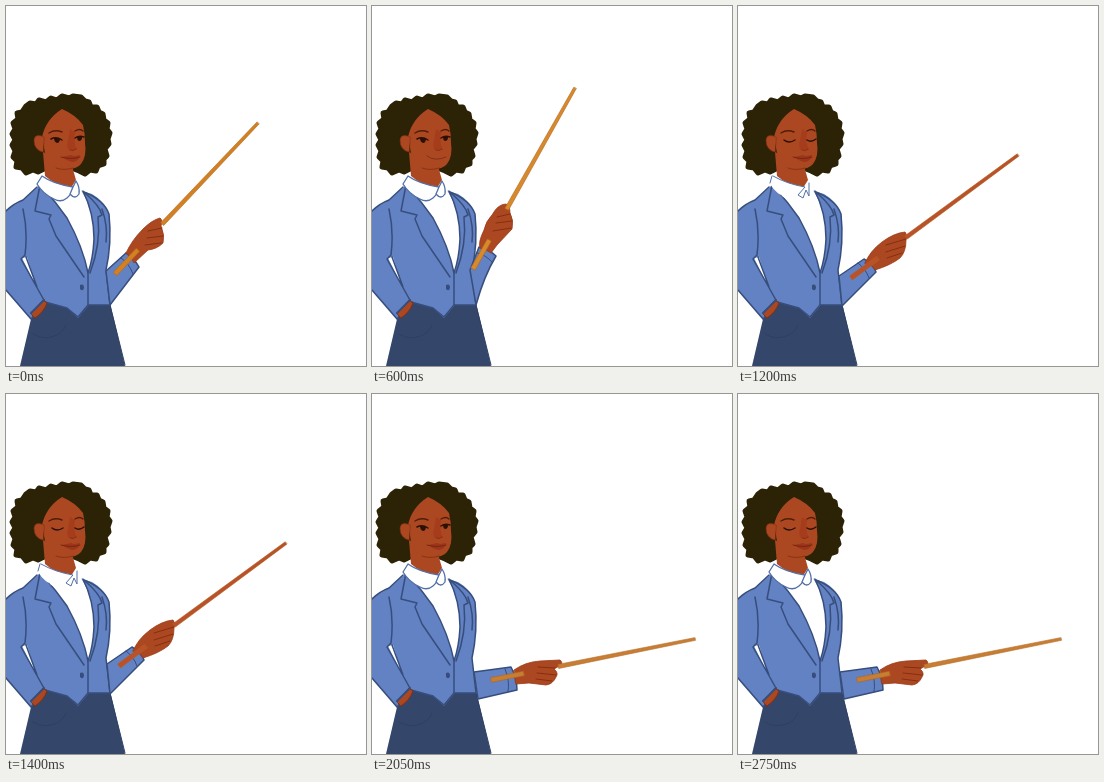
Write an HTML page with a canvas that moves like this. It is 360 px wide and 360 px high and loops after 2.8 s.

```html
<!DOCTYPE html>
<html lang="en">
<head>
<meta charset="utf-8">
<title>Teacher with pointer</title>
<style>
html, body { margin: 0; width: 100%; height: 100%; overflow: hidden; background: #fff; }
canvas { display: block; width: 360px; height: 360px; }
</style>
</head>
<body>
<canvas id="stage" width="360" height="360"></canvas>
<script>
const ctx = document.getElementById('stage').getContext('2d');
const LOOP = 2800, HOLD = 400;
const BLUE = '#6282c4', NAVY = '#374e7d', SKIRT = '#34466a', SKIN = '#ac4821',
      SHADE = '#842f10', HAIR = '#2c2306', WHITE = '#fff';

function fill(d, color) {
  ctx.fillStyle = color;
  ctx.fill(new Path2D(d));
}
function line(d, color = NAVY, width = 1.5) {
  ctx.strokeStyle = color;
  ctx.lineWidth = width;
  ctx.stroke(new Path2D(d));
}
function shape(d, color, edge = NAVY, width = 1.5) {
  fill(d, color);
  line(d, edge, width);
}

const poses = {
  high: {
    sleeve: 'M100 265L120 247Q128 252 133 261L104 299Z',
    cuff: 'M115 252Q123 257 127 268',
    hand: 'M120 247Q126 234 137 223Q146 214 154 212Q157 214 155 220Q159 229 157 237Q151 243 142 244L128 257Q125 250 120 247Z',
    fingers: 'M142 225L156 222M141 232L157 230M139 239L155 237',
    stick: [252, 117, 109, 268], color: '#d28122', collar: 'round', mouth: 'full'
  },
  upright: {
    sleeve: 'M98 264L107 241Q117 243 124 250Q112 270 104 299Z',
    cuff: 'M105 247Q114 249 120 256',
    hand: 'M108 242Q106 236 112 224Q114 215 120 209Q126 198 134 198Q138 200 138 207Q142 214 140 223L125 239L119 247Q114 243 108 242Z',
    fingers: 'M125 211L138 208M124 217L140 215M121 225L139 222',
    stick: [203, 82, 101, 263], color: '#d78a2c', collar: 'round', mouth: 'thin'
  },
  middle: {
    sleeve: 'M101 270L126 253Q135 258 138 266L104 300Z',
    cuff: 'M120 257Q128 263 131 272',
    hand: 'M127 257Q132 245 144 236Q156 227 167 226Q170 229 168 234Q168 246 162 252Q153 259 137 264Q134 258 127 257Z',
    fingers: 'M148 239L168 233M148 246L167 240M149 252L164 247',
    stick: [280, 149, 113, 272], color: '#b9512a', collar: 'pointed', mouth: 'full'
  },
  low: {
    sleeve: 'M102 278L139 273Q145 284 145 296L106 305Z',
    cuff: 'M133 275Q138 287 136 298',
    hand: 'M142 276Q153 268 168 267L188 266Q191 268 189 271L182 275Q187 279 184 283Q181 290 174 291L157 289L144 290Z',
    fingers: 'M166 273L183 274M165 279L184 281M164 285L180 287',
    stick: [323, 245, 119, 286], color: '#c67e35', collar: 'round', mouth: 'full'
  }
};

// One drawing per hold: pose and whether the eyes are open.
const drawings = [
  ['high', true], ['upright', true], ['upright', false], ['middle', false],
  ['middle', true], ['low', true], ['low', false]
];

function drawSkirt() {
  fill('M38 296L25 313L14 360H119L104 297Z', SKIRT);
  line('M27 328Q38 335 51 329Q58 325 60 319', '#2f4062', 1);
  line('M104 299L119 359', '#2d3f62', 1);
}

function drawJacket() {
  fill('M33 180L17 194L0 204V284L25 313L40 296L61 302L72 312L83 299L104 299L100 263Q105 240 104 211Q99 195 86 188L73 184Z', BLUE);
  fill('M16 252L21 251L30 280Z', WHITE);
  line('M31 181L17 194Q7 198 0 205M17 203Q22 225 19 249L15 253L39 296M20 251L31 281M0 284L25 313L40 296');
  line('M39 296L61 302L72 311L82 299H104L100 264Q106 237 103 208Q98 194 78 186');
  fill('M36 180L75 184Q87 202 88 229Q88 250 82 268Q77 241 61 212Q50 196 36 180Z', WHITE);
  line('M34 179L29 205L45 209L43 213L50 230L78 271');
  line('M36 181Q50 196 61 212Q77 241 82 267');
  line('M77 185Q88 207 88 233Q87 253 82 267V299M79 187Q94 200 96 209L92 211Q95 238 84 267M96 203Q102 220 100 236');
  fill('M74 279Q78 277 78 282Q77 286 74 283Z', NAVY);
  shape('M25 307Q31 302 37 294L41 297Q38 306 29 312Z', SKIN, SHADE, 1);
  line('M25 307L38 294', NAVY, 2);
}

function drawHair() {
  const outline = 'M20 100L24 97L30 98L33 94L40 96L45 92L51 94L56 90L63 92L67 90' +
    'L75 91L79 95L83 96L85 101L91 101L93 106L97 108L98 114L102 117L101 123' +
    'L104 127L102 133L103 138L99 143L101 150L98 153L98 158L92 160L90 165L84 164' +
    'L79 168L73 165L60 160L38 163L32 166L27 164L20 167L16 162L10 161L11 155' +
    'L7 151L9 145L6 139L9 134L6 128L9 123L7 117L12 113L11 107L16 106Z';
  shape(outline, HAIR, HAIR, 5);
}

function drawEyes(open) {
  line('M43 127Q49 123 56 126M69 125Q74 122 77 125', '#521d08', 1.4);
  if (open) {
    line('M45 133Q50 130 56 134M69 132Q73 129 78 131', '#2b1105', 1.5);
    fill('M48 132H54Q54 137 51 137Q48 136 48 132ZM71 131H76Q76 135 73 135Q71 134 71 131Z', '#2b1105');
  } else {
    line('M46 134Q51 138 57 134M69 134Q73 137 78 133', '#2b1105', 1.5);
  }
}

function drawHead(open, mouth) {
  drawHair();
  fill('M37 146L39 170Q49 179 65 182L70 174L66 160Z', SKIN);
  fill('M56 103Q70 109 77 119Q79 127 79 137Q81 150 75 158Q70 164 59 163Q46 158 39 147L36 131Q40 113 56 103Z', SKIN);
  shape('M38 131Q29 127 28 134Q28 144 37 146Z', SKIN, SHADE, 0.6);
  fill('M64 123L69 126Q67 137 71 144L63 144Q60 140 62 135Z', '#a53c1b');
  line('M64 144Q67 146 70 143', SHADE, 0.9);
  line('M50 162Q58 165 67 162', '#8b3213', 1);
  drawEyes(open);
  if (mouth === 'full') {
    fill('M56 151L65 149L68 150L74 149Q73 156 66 156Q61 155 56 151Z', '#9c351a');
    line('M55 151Q65 154 74 151', '#702410', 0.9);
  } else {
    line('M55 150Q63 156 74 151', '#833016', 1);
  }
}

function drawCollar(style) {
  if (style === 'round') {
    shape('M36 170Q47 178 67 181Q66 188 61 192Q55 197 48 193Q37 188 31 178Z', WHITE, '#526fa8', 1.3);
    shape('M67 181L70 175Q74 181 73 188Q69 194 64 188Z', WHITE, '#526fa8', 1.3);
  } else {
    fill('M35 170Q49 178 68 181L71 176L72 190L67 186L61 192L51 194Q38 188 32 178Z', WHITE);
    line('M35 170Q49 178 67 181L60 189L65 192L68 184L71 190V177M34 170L32 177M43 189L45 193', '#526fa8', 1);
  }
}

// Draws the part of a tapered stick between two fractions of its length.
function drawStick([x1, y1, x2, y2], from, to, color) {
  const length = Math.hypot(x2 - x1, y2 - y1);
  const nx = (y1 - y2) / length, ny = (x2 - x1) / length;
  const point = (t, side) => {
    const half = side * (1.4 + t);
    ctx.lineTo(x1 + (x2 - x1) * t + nx * half, y1 + (y2 - y1) * t + ny * half);
  };
  ctx.beginPath();
  point(from, 1);
  point(to, 1);
  point(to, -1);
  point(from, -1);
  ctx.closePath();
  ctx.fillStyle = color;
  ctx.fill();
  ctx.strokeStyle = '#b4631e';
  ctx.lineWidth = 0.6;
  ctx.stroke();
}

function drawArm({ sleeve, cuff, hand, fingers, stick, color }) {
  shape(sleeve, BLUE);
  line(cuff, NAVY, 1);
  shape(hand, SKIN, '#983a16', 0.8);
  drawStick(stick, 0, 0.67, color);
  drawStick(stick, 0.84, 1, color);
  line(fingers, SHADE, 1);
}

function draw(now) {
  const index = Math.floor(now % LOOP / HOLD);
  const [name, open] = drawings[index];
  const pose = poses[name];
  ctx.fillStyle = WHITE;
  ctx.fillRect(0, 0, 360, 360);
  ctx.lineCap = ctx.lineJoin = 'round';
  drawSkirt();
  drawJacket();
  drawHead(open, pose.mouth);
  drawCollar(pose.collar);
  drawArm(pose);
}

const start = performance.now();
function tick() {
  draw(performance.now() - start);
  requestAnimationFrame(tick);
}
tick();
</script>
</body>
</html>
```
